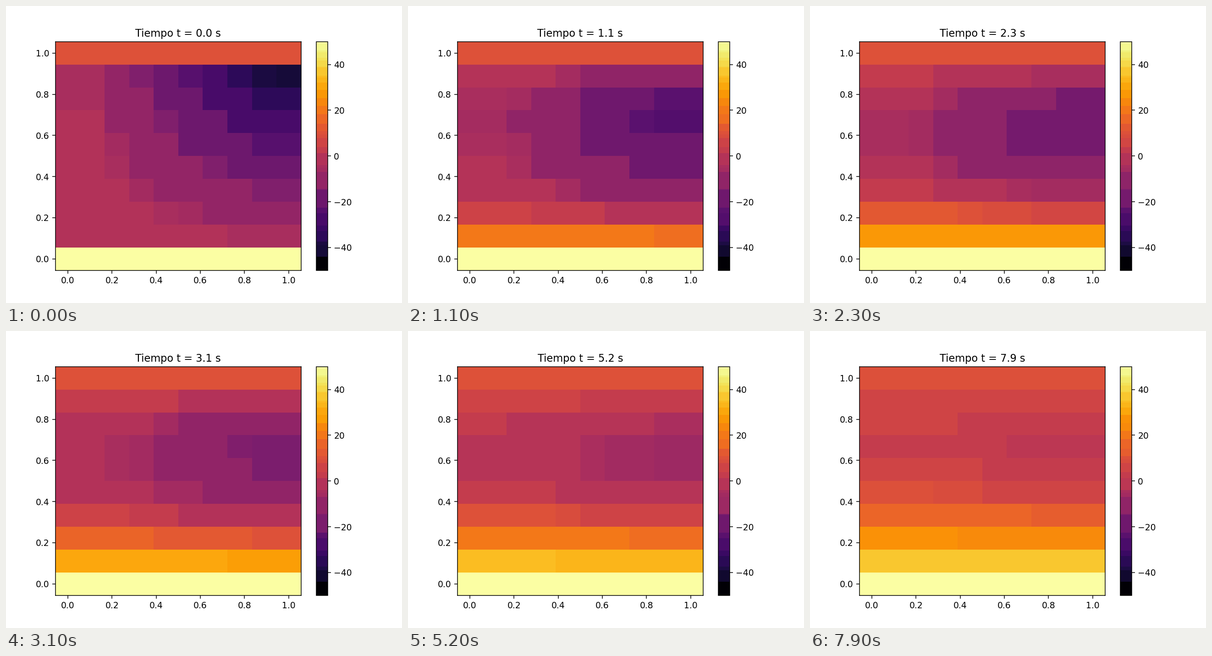
Recreate the animation shown at these times as a matplotlib script. Size 864x648 px, loop 8000 ms.

```python
import matplotlib.pyplot as plt
import numpy as np
from matplotlib.animation import FuncAnimation
from matplotlib.colors import ListedColormap

N = 10            # grid points per side
ALPHA = 0.01      # diffusivity
DT = 0.01
FRAMES = 80
STEPS = 10        # solver steps per frame
T_BOTTOM, T_TOP = 50, 10
VMIN, VMAX = -50, 50

axis = np.linspace(0, 1, N)
X, Y = np.meshgrid(axis, axis)
K = ALPHA * DT / (axis[1] - axis[0]) ** 2


def step(T):
    """Insulated sides, fixed top and bottom, then one explicit step."""
    T = T.copy()
    T[:, 0], T[:, -1] = T[:, 1], T[:, -2]
    T[0], T[-1] = T_BOTTOM, T_TOP
    mid = T[1:-1, 1:-1]
    lap = T[2:, 1:-1] + T[:-2, 1:-1] + T[1:-1, 2:] + T[1:-1, :-2] - 4 * mid
    T[1:-1, 1:-1] = mid + K * lap
    return T


def solve():
    T = step(-50 * X * Y)
    states = [T]
    for _ in range(FRAMES - 1):
        for _ in range(STEPS):
            T = step(T)
        states.append(T)
    return states


# Adaptive palette: colours sharing a coarse RGB bucket merge to their mean.
LUT = np.rint(plt.get_cmap("inferno")(np.arange(256))[:, :3] * 255).astype(int)
KEYS = (LUT[:, 0] >> 5) * 1024 + (LUT[:, 1] >> 4) * 32 + (LUT[:, 2] >> 5)
_, BUCKET = np.unique(KEYS, return_inverse=True)
CELL_AREA, BAR_AREA, INK_AREA = 2673, 48.6, 1500


def palette(T):
    level = ((T - VMIN) / (VMAX - VMIN) * 256).astype(int).clip(0, 255)
    weight = BAR_AREA + CELL_AREA * np.bincount(level.ravel(), minlength=256)
    total = np.bincount(BUCKET, weight)
    total[BUCKET[0]] += INK_AREA    # black lines and text
    mean = [np.bincount(BUCKET, weight * c) / total for c in LUT.T]
    rgb = np.floor(np.stack(mean, axis=1))[BUCKET] / 255
    return ListedColormap(rgb)


states = solve()
fig, ax = plt.subplots(figsize=(6.4, 4.8), dpi=135)
mesh = ax.pcolormesh(X, Y, states[0], cmap=palette(states[0]),
                     vmin=VMIN, vmax=VMAX, shading="nearest")
fig.colorbar(mesh, ax=ax)
title = ax.set_title("Tiempo t = 0.0 s")


def update(i):
    mesh.set_array(states[i])
    mesh.set_cmap(palette(states[i]))
    title.set_text(f"Tiempo t = {i * STEPS * DT:.1f} s")
    return mesh, title


anim = FuncAnimation(fig, update, frames=FRAMES, interval=100, repeat=True)
plt.show()
```
